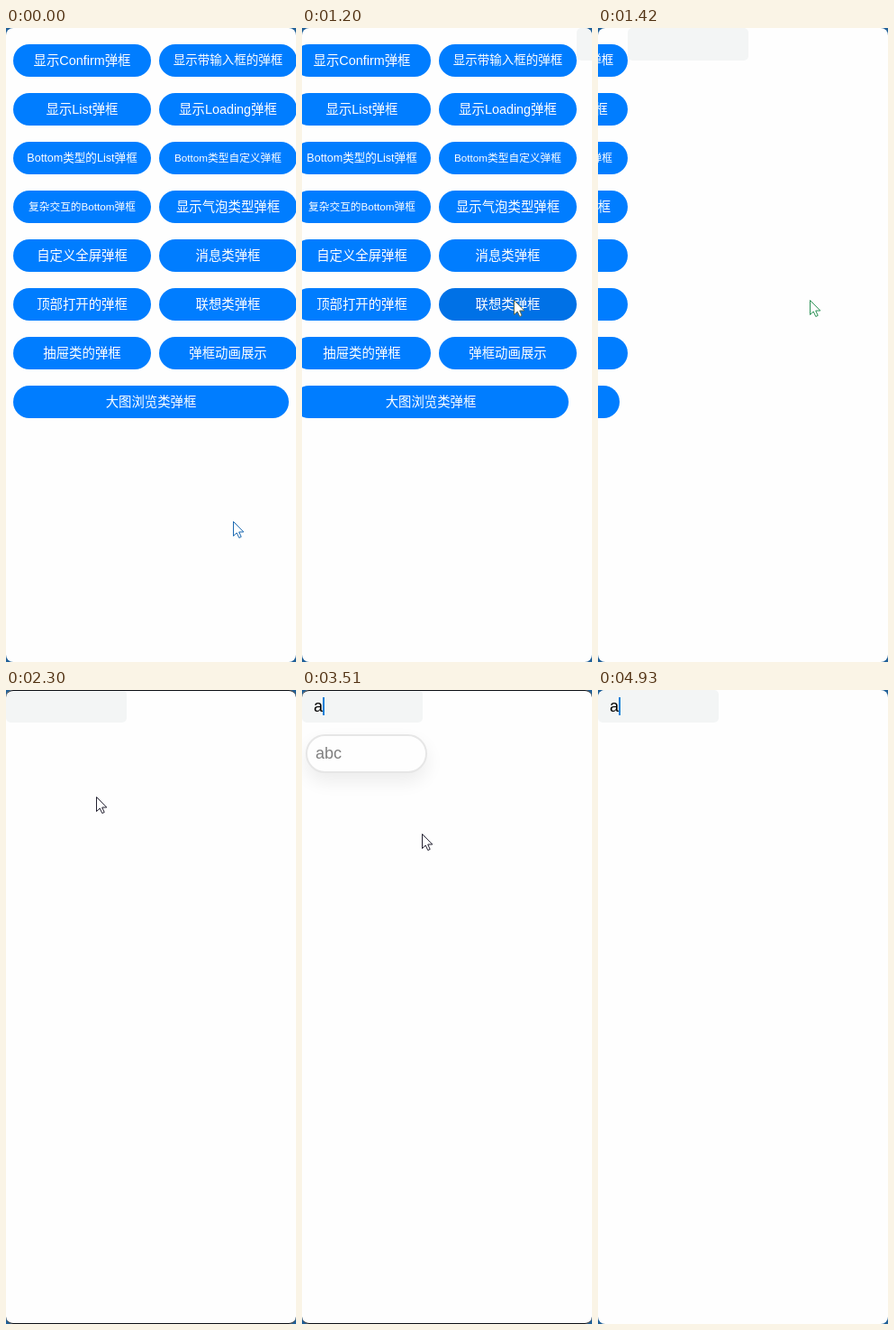
An HTML page that plays this animation: 322 px wide and 702 px high, repeating every 5050 ms.

```html
<!DOCTYPE html>
<html lang="zh-CN">
<head>
<meta charset="utf-8">
<title>弹框</title>
<style>
  html, body { margin: 0; width: 100%; height: 100%; overflow: hidden; }
  body {
    background: #1f5f98;
    font-family: "Liberation Sans", "Noto Sans CJK SC", "Noto Sans CJK", sans-serif;
  }
  .stage { position: relative; width: 322px; height: 702px; overflow: hidden; }
  .stage, .stage * { box-sizing: border-box; }
  .screen, .frame { position: absolute; inset: 0; border-radius: 8px; }
  .screen { overflow: hidden; background: #fefefe; }
  .page { position: absolute; top: 0; left: 0; width: 323px; height: 702px; }

  /* every change is a hard step on one shared clock */
  .home, .next, .pressed, .typed, .caret, .popup, .frame, .cursor, .cursor path {
    animation: 5050ms step-end infinite;
  }

  .btn {
    position: absolute; width: 153px; height: 36px; border-radius: 18px;
    background: #007dff; color: #fff;
    font-size: 14.4px; line-height: 36px; text-align: center; white-space: nowrap;
  }
  .home { animation-name: leave; }
  .next { left: 323px; animation-name: leave; }
  .pressed { animation-name: press; }

  .input {
    position: absolute; left: 0; top: 0; width: 134px; height: 36px;
    border-radius: 5px; background: #f3f5f5;
  }
  .typed, .popup { font-size: 18px; color: #000; }
  .typed { position: absolute; left: 13px; top: 0; line-height: 36px; animation-name: type; }
  .caret {
    position: absolute; left: 23px; top: 8px; width: 2px; height: 20px;
    background: #1080d8; animation-name: blink;
  }
  .popup {
    position: absolute; left: 4px; top: 49px; width: 135px; height: 43px;
    padding-left: 9px; line-height: 39px;
    border: 2px solid #cfcfcf; border-radius: 22px; background: #fff;
    box-shadow: 0 9px 20px rgba(0, 0, 0, .15);
    animation-name: suggest;
  }

  .frame { border: solid #0c0f14; border-width: 1px 0; animation-name: focus; }
  .cursor { position: absolute; left: 0; top: 0; width: 14px; height: 21px; overflow: visible; animation-name: point; }
  .cursor path { fill: #fff; stroke-width: 1; animation-name: tint; }

  @keyframes leave {
    0% { transform: none; }
    21.58% { transform: translateX(-1px); }
    23.76% { transform: translateX(-18px); }
    25.94% { transform: translateX(-160px); }
    28.11% { transform: translateX(-290px); }
    30.09% { transform: translateX(-318px); }
    32.47%, 100% { transform: translateX(-323px); }
  }
  @keyframes press {
    0% { background: #007dff; }
    19.4% { background: #0071e6; }
    28.11%, 100% { background: #007dff; }
  }
  @keyframes type {
    0% { opacity: 0; }
    47.92%, 100% { opacity: 1; }
  }
  @keyframes blink {
    0% { opacity: 0; }
    47.92% { opacity: 1; }
    56.63% { opacity: 0; }
    69.5% { opacity: 1; }
    78.01% { opacity: 0; }
    89.1%, 100% { opacity: 1; }
  }
  @keyframes suggest {
    0% { opacity: 0; }
    49.9% { opacity: .6; }
    51.88% { opacity: 1; }
    69.5% { opacity: .5; }
    71.68%, 100% { opacity: 0; }
  }
  @keyframes focus {
    0% { opacity: 0; }
    36.83% { opacity: 1; }
    97.62%, 100% { opacity: 0; }
  }
  @keyframes point {
    0% { transform: translate(252px, 546px); }
    1.98% { transform: translate(250px, 510px); }
    4.15% { transform: translate(240px, 400px); }
    6.33% { transform: translate(229px, 310px); }
    8.31% { transform: translate(235px, 295px); }
    12.87% { transform: translate(235px, 301px); }
    36.83% { transform: translate(228px, 285px); }
    39% { transform: translate(190px, 230px); }
    41.18% { transform: translate(140px, 160px); }
    43.36% { transform: translate(108px, 125px); }
    45.54% { transform: translate(100px, 118px); }
    56.63% { transform: translate(102px, 126px); }
    58.61% { transform: translate(114px, 152px); }
    60.79% { transform: translate(128px, 157px); }
    62.97% { transform: translate(133px, 159px); }
    74.05% { transform: translate(124px, 158px); }
    78.01% { transform: translate(112px, 178px); }
    80.39% { transform: translate(104px, 219px); }
    82.97% { transform: translate(160px, 430px); }
    85.14% { transform: translate(212px, 594px); opacity: 1; }
    97.62%, 100% { transform: translate(212px, 594px); opacity: 0; }
  }
  @keyframes tint {
    0% { stroke: #1a68b0; }
    6.33% { stroke: #5a6a50; }
    28.11% { stroke: #2a9054; }
    36.83%, 100% { stroke: #222030; }
  }
</style>
</head>
<body>
<div class="stage">
  <div class="screen">
    <div class="page home" id="home"></div>
    <div class="page next">
      <div class="input"></div>
      <div class="typed">a</div>
      <div class="caret"></div>
      <div class="popup">abc</div>
    </div>
  </div>
  <div class="frame"></div>
  <svg class="cursor" viewBox="0 0 14 21">
    <path d="M.5 .5V16.5L4.2 13L6.8 18.5L9.2 17.4L6.7 12H11.8Z"/>
  </svg>
</div>
<script>
  // label, and a font size where it differs from the default
  const buttons = [
    ['显示Confirm弹框'], ['显示带输入框的弹框', 13.5],
    ['显示List弹框'], ['显示Loading弹框'],
    ['Bottom类型的List弹框', 12.6], ['Bottom类型自定义弹框', 11.7],
    ['复杂交互的Bottom弹框', 11.7], ['显示气泡类型弹框'],
    ['自定义全屏弹框'], ['消息类弹框'],
    ['顶部打开的弹框'], ['联想类弹框'],
    ['抽屉类的弹框'], ['弹框动画展示'],
    ['大图浏览类弹框']
  ];
  const home = document.getElementById('home');
  buttons.forEach(([label, size], i) => {
    const btn = document.createElement('div');
    btn.className = label === '联想类弹框' ? 'btn pressed' : 'btn';
    btn.textContent = label;
    btn.style.left = (i % 2 ? 170 : 8) + 'px';
    btn.style.top = 18 + 54 * Math.floor(i / 2) + 'px';
    if (size) btn.style.fontSize = size + 'px';
    if (i === buttons.length - 1) btn.style.width = '306px';
    home.append(btn);
  });
</script>
</body>
</html>
```
